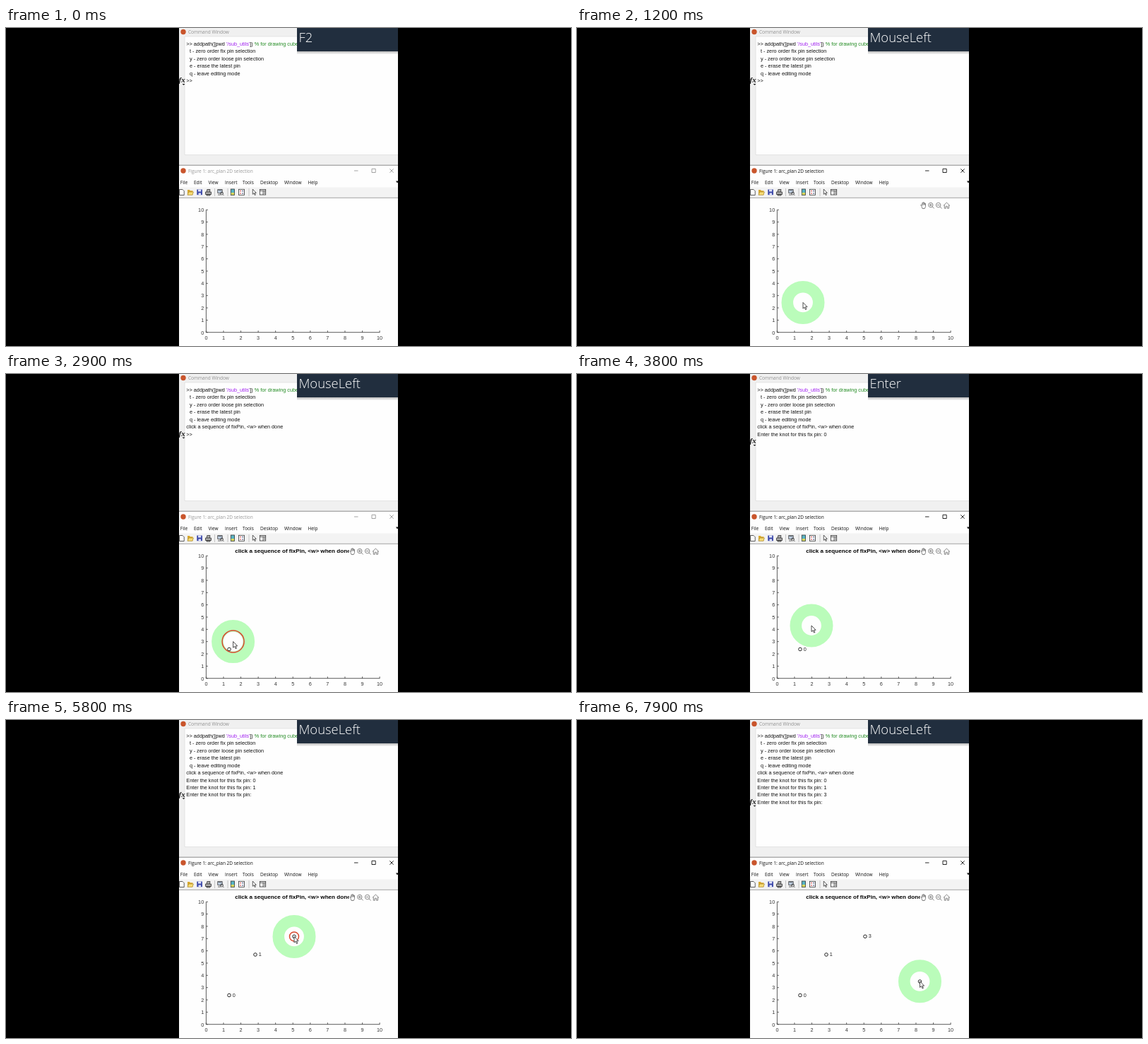
Recreate the animation shown at these times as an HTML page. Size 800 by 450 pixels, loop 8000 ms.

```html
<!DOCTYPE html>
<html lang="en">
<head>
<meta charset="utf-8">
<title>Pin selection</title>
<style>
  html, body { margin: 0; width: 100%; height: 100%; overflow: hidden; background: #000; }
  svg { display: block; width: 800px; height: 450px; }
  text { white-space: pre; }
  .ui { font: 6.5px "Open Sans", "Noto Sans", sans-serif; }
  .plain { font: 7.27px "Liberation Sans", Arial, sans-serif; }
  .head { font: bold 8.1px "Liberation Sans", Arial, sans-serif; }
  .key { font: 300 18.4px "Open Sans", "Noto Sans", sans-serif; fill: #fff; }
  .fx { font: italic bold 11px "Liberation Serif", Times, serif; fill: #222; }
  .line { fill: none; stroke: #333; stroke-width: .8; }
  .tool { fill: none; stroke: #777; stroke-width: .9; }
</style>
</head>
<body>
<svg viewBox="0 0 800 450">
  <defs>
    <clipPath id="panel"><rect x="245" width="310" height="450"/></clipPath>
    <linearGradient id="shade" x2="0" y2="1">
      <stop stop-color="#000" stop-opacity=".3"/><stop offset="1" stop-color="#000" stop-opacity="0"/>
    </linearGradient>
  </defs>
  <rect width="800" height="450"/>
  <g clip-path="url(#panel)">
    <rect x="245" width="310" height="450" fill="#fefefe"/>

    <!-- Command window -->
    <path fill="#f0f0f0" d="M245 0h310v12H253V179.500H555V194H245z"/>
    <path fill="none" stroke="#dcdcdc" stroke-width=".7" d="M555 12H253V179.500H555"/>
    <circle cx="251" cy="5.500" r="3.700" fill="#c9552c"/>
    <text class="ui" x="258" y="8.200" fill="#929292">Command Window</text>
    <g id="console" class="plain" fill="#111"></g>
    <g id="fx">
      <text class="fx" x="244.500" y="3">fx</text>
      <path d="M249.500 4.500h4l-2 2z" fill="#222"/>
    </g>

    <!-- Figure window -->
    <path stroke="#8c8c8c" d="M245 194.200h310"/>
    <circle cx="251" cy="202" r="3.700" fill="#c9552c"/>
    <g id="titlebar">
      <text class="ui" x="258" y="204.500" fill="currentColor">Figure 1: arc_plan 2D selection</text>
      <path fill="none" stroke="currentColor" stroke-width=".9"
        d="M493 202h5.500M518 199.300h5.200v5.200h-5.200zM543.300 199.300l5.400 5.400m0-5.400l-5.400 5.400"/>
    </g>
    <g id="menu" class="ui" fill="#111"></g>
    <path d="M552 216.500h4l-2 3z" fill="#111"/>

    <rect x="245" y="225.500" width="310" height="14.500" fill="#f3f3f3"/>
    <path stroke="#9a9a9a" stroke-width=".9" d="M245 240.300h310"/>
    <path stroke="#b8b8b8" stroke-width=".8" d="M295.500 227v11M314 227v11M344 227v11"/>
    <path class="line" fill="#fff" style="fill:#fff" d="M245.500 228.500h4.500l2.200 2.200v5.800h-6.700z"/>
    <path d="M257 229h3l1 1.200h3.500v6H257z" fill="#d9a92e"/>
    <path d="M258.500 232h7l-1.700 4.300H257z" fill="#f8dc74" stroke="#8a6a18" stroke-width=".5"/>
    <rect x="270.300" y="228.500" width="7.600" height="7.700" fill="#3a46a8"/>
    <path fill="#dfe4f8" d="M272 228.500h4.200v3H272zM272.500 233.500h3.500v2.700h-3.500z"/>
    <path class="line" style="fill:#aaa" d="M282.500 232h8v3.500h-8zM284 232l.8-3.500h4.200l-.6 3.500M284 235.500h5v1.500h-5z"/>
    <path class="line" style="fill:#cfe0f4" d="M299.700 228.500h6.500v5h-6.500zM300.500 230h5"/>
    <circle class="line" cx="305.500" cy="234" r="2"/><path class="line" d="M300 236h4m3-0.500l1.500 1.500"/>
    <rect x="318.300" y="228" width="5.200" height="8.500" fill="#58b5c4" stroke="#333" stroke-width=".8"/>
    <path fill="#d8d45a" d="M318.700 233h4.400v3.100h-4.400z"/>
    <rect class="line" style="fill:#fff" x="329.500" y="228.300" width="8" height="8"/>
    <path stroke="#c33" d="M331 230.700h2M331 234h2"/><path stroke="#347" d="M334 230.700h2.300M334 234h2.300"/>
    <path class="line" style="fill:#fff" d="M349.300 228v7.300l1.700-1.600 1.300 2.900 1.100-.5-1.300-2.800h2.200z"/>
    <rect class="line" style="fill:#fff" x="359.500" y="228.500" width="8.200" height="7.500"/>
    <path class="line" d="M359.500 230.300h8.200M364 230.300v5.700M365 232h2M365 234h2"/>

    <!-- Plot -->
    <g id="plot" class="plain" fill="#333"></g>
    <text id="heading" class="head" x="406" y="253.300" text-anchor="middle">click a sequence of fixPin, &lt;w&gt; when done</text>
    <g id="tools">
      <rect x="485.500" y="245" width="44" height="12" fill="#fefefe"/>
      <path class="tool" d="M488 252.500l-1.300-2 .8-.5 1.300 1.300v-3.800h1.100v-.7h1.200v.6h1.200v1h1.200v4.300l-1.200 2.800H489z"/>
      <path class="tool" d="M490 247.500v3m1.200-3v3m1.200-2.500v2.500"/>
      <g class="tool">
        <circle cx="500.800" cy="250.500" r="3.200"/><path d="M503.200 252.900l2.500 2.500M499 250.500h3.600M500.800 248.700v3.600"/>
        <circle cx="511.600" cy="250.500" r="3.200"/><path d="M514 252.900l2.500 2.500M509.800 250.500h3.600"/>
        <path d="M518.800 251.500l4.600-4.500 4.600 4.500M520.300 250.500v4.700h2v-3h2.200v3h2v-4.700"/>
      </g>
    </g>
    <g id="pins" class="plain" fill="#222"></g>

    <!-- Pointer -->
    <g id="pointer">
      <circle r="22.200" fill="none" stroke="#bbfdbb" stroke-width="16.600" style="mix-blend-mode:multiply"/>
      <circle id="pulse" fill="none" stroke="#d9482f" stroke-width="1.500"/>
      <path d="M0 0v8.600l2-1.800 1.500 3.300 1.400-.6-1.500-3.200h2.700z" fill="#fff" stroke="#222" stroke-width=".8"/>
    </g>

    <!-- Key display -->
    <rect x="412" y="32.500" width="143" height="5" fill="url(#shade)"/>
    <rect x="412" width="143" height="33" fill="#212e3e"/>
    <text id="key" class="key" x="414.500" y="19.700"></text>
  </g>
</svg>
<script>
const LOOP = 8000, STEP = 100, ROW = 10.47;
const $ = id => document.getElementById(id);

function add(parent, tag, attrs, text = "") {
  const el = document.createElementNS("http://www.w3.org/2000/svg", tag);
  for (const name in attrs) el.setAttribute(name, attrs[name]);
  el.textContent = text;
  return parent.appendChild(el);
}

const show = (el, on) => { el.style.display = on ? "" : "none"; };
const latest = (table, t) => table.filter(row => row[0] <= t).pop();
const rowY = i => 24.7 + ROW * i;

// Menu and axes
[["File", 246.8], ["Edit", 266], ["View", 286.500], ["Insert", 310], ["Tools", 335],
 ["Desktop", 360], ["Window", 394], ["Help", 427.500]]
  .forEach(([name, x]) => add($("menu"), "text", { x, y: 220.5 }, name));

const plot = $("plot");
add(plot, "path", { class: "line", d: "M283.400 257.300V430.700H529.300" });
for (let i = 0; i <= 10; i++) {
  const x = 283.4 + 24.57 * i, y = 430.7 - 17.34 * i;
  add(plot, "path", { class: "line", d: `M${x} 430.700v-2.500M283.400 ${y}h2.500` });
  add(plot, "text", { x, y: 441.3, "text-anchor": "middle" }, i);
  add(plot, "text", { x: 280.2, y: y + 2.8, "text-anchor": "end" }, i);
}

// Console
const con = $("console");
const command = add(con, "text", { x: 255.3, y: rowY(0) });
[[">> addpath([pwd ", "#111"], ["'/sub_utils'", "#a020f0"], ["]) ", "#111"], ["% for drawing cube", "#228b22"]]
  .forEach(([part, fill]) => add(command, "tspan", { fill }, part));
["t - zero order fix pin selection", "y - zero order loose pin selection",
 "e - erase the latest pin", "q - leave editing mode"]
  .forEach((line, i) => add(con, "text", { x: 260, y: rowY(i + 1) }, line));

const ask = "Enter the knot for this fix pin: ";
const rows = [
  [[0, ">>"], [2200, "click a sequence of fixPin, <w> when done"]],
  [[0, ""], [2200, ">>"], [3000, ask], [3400, ask + "0"]],
  [[0, ""], [4400, ask], [5200, ask + "1"]],
  [[0, ""], [5800, ask], [6900, ask + "3"]],
  [[0, ""], [7800, ask]]
].map((steps, i) => ({ steps, el: add(con, "text", { x: 255.3, y: rowY(i + 5) }) }));

const promptRow = [[0, 5], [2200, 6], [3700, 7], [5400, 8], [7100, 9]];
const focus = [[0, false], [800, true], [2800, false], [3700, true],
  [5100, false], [5400, true], [6700, false], [7100, true]];
const keys = [[0, "F2"], [700, "MouseLeft"], [2000, "T"], [2600, "MouseLeft"], [3400, "0"],
  [3700, "Enter"], [4300, "MouseLeft"], [5200, "1"], [5400, "Enter"], [5700, "MouseLeft"],
  [6900, "3"], [7100, "Enter"], [7700, "MouseLeft"]];

// x, y, shown at, label, labelled at
const pins = [
  [316, 389.5, 2600, "0", 3700], [353, 332, 4400, "1", 5400],
  [408, 306.3, 5700, "3", 7100], [485.5, 370, 7800, "", LOOP]
].map(([x, y, at, label, labelAt]) => ({
  at, labelAt,
  dot: add($("pins"), "circle", { class: "line", cx: x, cy: y, r: 2.3, style: "stroke:#111;stroke-width:.9" }),
  tag: add($("pins"), "text", { x: x + 4.7, y: y + 2 }, label)
}));

const path = [
  [100, 590, 330], [600, 320, 387], [1200, 320, 388.4], [1800, 318, 391], [2600, 316, 389.5],
  [2900, 321.6, 378.6], [3600, 330, 360], [3800, 332, 356], [4300, 353, 332.3], [5200, 353, 332.3],
  [5700, 408, 306.4], [5800, 408, 306.4], [6200, 415.5, 326], [6800, 415.5, 326],
  [7200, 461, 325.2], [7500, 470, 341], [7800, 485.5, 369.8]
];
const pulses = [600, 2600, 4900, 5700];

function pointerAt(t) {
  const i = path.findIndex(p => p[0] > t);
  if (i < 1) return i ? path[path.length - 1].slice(1) : path[0].slice(1);
  const [a, b] = [path[i - 1], path[i]];
  const u = (t - a[0]) / (b[0] - a[0]), e = u * u * (3 - 2 * u);
  return [a[1] + (b[1] - a[1]) * e, a[2] + (b[2] - a[2]) * e];
}

function render(t) {
  rows.forEach(({ steps, el }) => { el.textContent = latest(steps, t)[1]; });
  $("fx").setAttribute("transform", `translate(0 ${rowY(latest(promptRow, t)[1]) - 2.6})`);
  $("titlebar").style.color = latest(focus, t)[1] ? "#111" : "#999";
  $("key").textContent = latest(keys, t)[1];
  show($("heading"), t >= 2200);
  $("tools").style.opacity = Math.min(1, Math.max(0, (t - 800) / 300));
  pins.forEach(p => { show(p.dot, t >= p.at); show(p.tag, t >= p.labelAt); });

  $("pointer").setAttribute("transform", `translate(${pointerAt(t).join(" ")})`);
  const start = pulses.find(p => t > p && t < p + 400);
  show($("pulse"), start !== undefined);
  if (start !== undefined) $("pulse").setAttribute("r", 2 + 4.5 * (t - start) / 100);
}

const origin = performance.now();
function frame() {
  const t = (performance.now() - origin) % LOOP;
  render(Math.floor(t / STEP) * STEP);
  requestAnimationFrame(frame);
}
frame();
</script>
</body>
</html>
```
